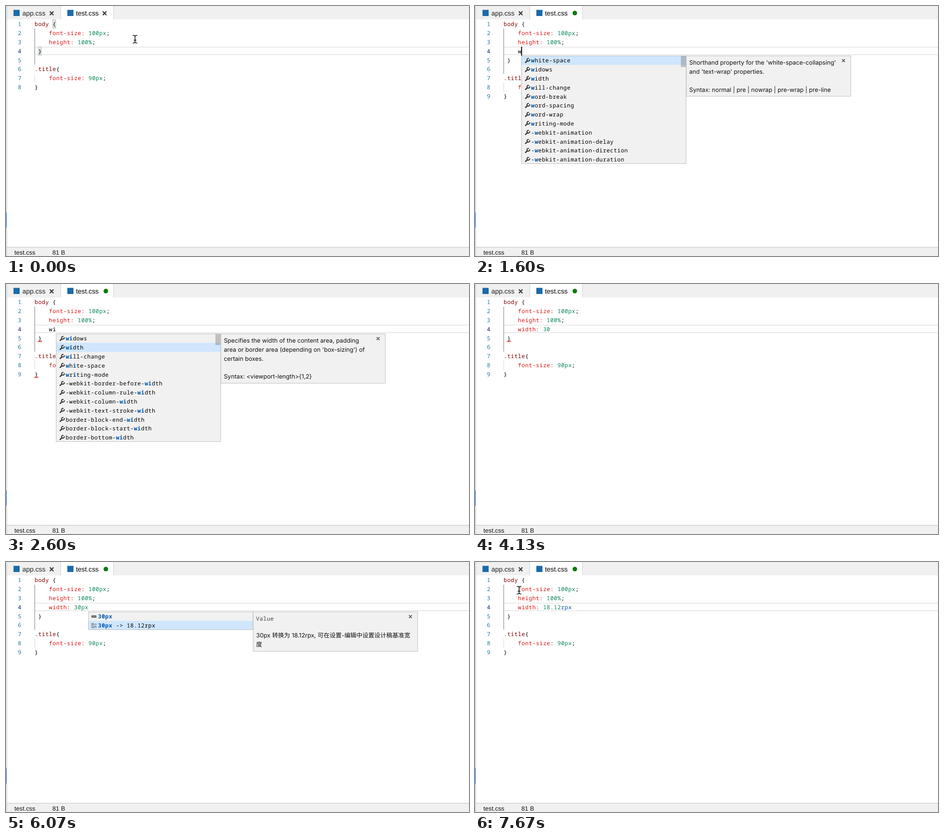
Write an HTML page that moves like this. It is 1019 px wide and 550 px high and loops after 8000 ms.

```html
<!DOCTYPE html>
<html lang="en">
<head>
<meta charset="utf-8">
<title>Stylesheet editor</title>
<style>
  html, body { margin: 0; width: 100%; height: 100%; overflow: hidden; background: #fff; }
  svg { display: block; width: 1019px; height: 550px; }
  text { white-space: pre; text-rendering: geometricPrecision; }
  .code { font: 12.3px "Noto Sans Mono", "DejaVu Sans Mono", monospace; letter-spacing: .52px; fill: #000; }
  .tab { font: 14.75px "Liberation Sans", Arial, sans-serif; fill: #222; }
  .on { fill: #000; }
  .bar { font: 13.6px "Liberation Sans", Arial, sans-serif; fill: #111; }
  .doc { font: 13.1px Inter, "Noto Sans CJK SC", "Noto Sans CJK", sans-serif; fill: #111; }
  .cjk { font-size: 13.2px; }
  .sel { fill: #800000; }
  .prop { fill: #dd1111; }
  .val { fill: #098658; }
  .word { fill: #0451a5; }
  .num { fill: #237893; }
  .cur { fill: #0b216f; }
  .grey { fill: #444; }
  .hit { fill: #0059ac; font-weight: 700; }
  .line { fill: none; stroke-linecap: round; }
</style>
</head>
<body>
<svg viewBox="0 0 1019 550" xmlns="http://www.w3.org/2000/svg">
  <g id="chrome"></g>
  <g id="editor"></g>
  <g id="mouse" class="line">
    <path id="beam" d="M-4.4-8.6Q-.4-8.6 0-6.2Q.4-8.6 4.4-8.6M0-6.4V6.4M-4.4 8.6Q-.4 8.6 0 6.2Q.4 8.6 4.4 8.6M-2.2 2.2H2.2" stroke="#fff" stroke-width="3.4"/>
    <use href="#beam" style="stroke:#000"/>
  </g>
</svg>
<script>
const LOOP = 8000, TICK = 200 / 3;
const LEFT = 63, CHAR = 7.9, TOP = 30, ROW = 19.8;
const $ = id => document.getElementById(id);

const esc = s => s.replace(/&/g, "&amp;").replace(/</g, "&lt;").replace(/>/g, "&gt;");
const text = (x, y, s, cls) => `<text x="${x}" y="${y}" class="${cls}">${s}</text>`;
const rect = (x, y, w, h, fill, more = "") =>
  `<rect x="${x}" y="${y}" width="${w}" height="${h}" fill="${fill}" ${more}/>`;
const path = (d, stroke, width) =>
  `<path class="line" d="${d}" stroke="${stroke}" stroke-width="${width}"/>`;
const cross = (x, y, r, width) =>
  path(`M${x - r} ${y - r}L${x + r} ${y + r}M${x + r} ${y - r}L${x - r} ${y + r}`, "#424242", width);
const colX = col => LEFT + CHAR * col;
const lineY = n => TOP + ROW * (n - 1);
const baseY = n => lineY(n) + 14.3;

// "prop|font-size:" style runs joined by "~"
const runs = s => s.split("~").map(r => {
  const [cls, str] = r.includes("|") ? r.split("|") : ["", r];
  return `<tspan class="${cls}">${esc(str)}</tspan>`;
}).join("");
// *stars* mark the matched letters
const marked = s => s.split("*").map((p, i) => i % 2 ? `<tspan class="hit">${esc(p)}</tspan>` : esc(p)).join("");

const W_ITEMS = ["*w*hite-space", "*w*idows", "*w*idth", "*w*ill-change", "*w*ord-break", "*w*ord-spacing",
  "*w*ord-wrap", "*w*riting-mode", "-*w*ebkit-animation", "-*w*ebkit-animation-delay",
  "-*w*ebkit-animation-direction", "-*w*ebkit-animation-duration"];
const WI_ITEMS = ["*wi*dows", "*wi*dth", "*wi*ll-change", "*w*h*i*te-space", "*w*r*i*ting-mode",
  "-webkit-border-before-*wi*dth", "-webkit-column-rule-*wi*dth", "-webkit-column-*wi*dth",
  "-webkit-text-stroke-*wi*dth", "border-block-end-*wi*dth", "border-block-start-*wi*dth",
  "border-bottom-*wi*dth"];
const P_ITEMS = ["*30p*c", "*30p*t", "*30p*x", "*30p*x -> 18.12rpx"];
const PX_ITEMS = ["*30px*", "*30px* -> 18.12rpx"];

const SPACE_DOC = ["Shorthand property for the 'white-space-collapsing'", "and 'text-wrap' properties.", "",
  "Syntax: normal | pre | nowrap | pre-wrap | pre-line"];
const WIDOWS_DOC = ["Specifies the minimum number of line boxes of a", "block container that must be left in a fragment",
  "after a break.", "", "Syntax: <integer>"];
const WIDTH_DOC = ["Specifies the width of the content area, padding", "area or border area (depending on 'box-sizing') of",
  "certain boxes.", "", "Syntax: <viewport-length>{1,2}"];
const VALUE_DOC = ["30px 转换为 18.12rpx, 可在设置-编辑中设置设计稿基准宽", "度"];

const list = (col, items, pick, width = 362) => ({ col, items, pick, width });
const PROP = "prop|width:~ ";

// each step changes part of the state
const STEPS = [
  [0, { added: null, line: 4, col: 2, caret: 0, braces: 1, dirty: 0, pop: null, doc: null, bad: [] }],
  [330, { line: 3, col: 17, caret: 1, braces: 0 }],
  [800, { added: "", line: 4, col: 4 }],
  [870, { dirty: 1 }],
  [1330, { caret: 0 }],
  [1470, { added: "w", col: 5, caret: 1 }],
  [1530, { pop: list(5, W_ITEMS, 0) }],
  [1600, { doc: SPACE_DOC }],
  [1870, { added: "wi", col: 6 }],
  [1930, { pop: list(6, WI_ITEMS, 0), doc: null }],
  [2000, { doc: WIDOWS_DOC }],
  [2200, { bad: [5, 9] }],
  [2330, { pop: list(6, WI_ITEMS, 1) }],
  [2400, { doc: WIDTH_DOC, caret: 0 }],
  [2670, { added: PROP, col: 11, caret: 1, pop: null, doc: null }],
  [3070, { bad: [5] }],
  [3200, { caret: 0 }],
  [3470, { added: PROP + "~val|3", col: 12, caret: 1 }],
  [3670, { added: PROP + "~val|30", col: 13 }],
  [4130, { caret: 0 }],
  [4200, { added: PROP + "~val|30~word|p", col: 14, caret: 1, pop: list(14, P_ITEMS, 0, 472) }],
  [4400, { added: PROP + "~val|30px", col: 15 }],
  [4470, { pop: list(15, PX_ITEMS, 0, 472) }],
  [4870, { caret: 0, bad: [] }],
  [4930, { pop: list(15, PX_ITEMS, 1, 472) }],
  [5070, { pop: list(15, PX_ITEMS, 1), doc: VALUE_DOC }],
  [5400, { caret: 1 }],
  [5870, { caret: 0 }],
  [6130, { added: PROP + "~val|18.12~word|rpx", col: 19, caret: 1, pop: null, doc: null }],
  [6600, { caret: 0 }],
  [7130, { caret: 1 }],
  [7600, { caret: 0 }]
];

// time, x, y of the pointer
const MOVES = [[0, 284, 73], [330, 252, 82], [800, 252, 82], [7000, 252, 82], [7670, 97, 62], [LOOP, 97, 62]];

function chrome() {
  const edge = "#d0d0d0";
  return rect(0, 0, 1019, 29.5, "#f0f0f0") + rect(121, 0, 115.5, 30, "#fff") +
    rect(120, 0, 1, 29.5, edge) + rect(236, 0, 1, 29.5, edge) +
    rect(0, 530, 1019, 20, "#f0f0f0") + rect(0, 530, 1019, 1.2, "#c8c8c8") +
    rect(0, 0, 1, 550, "#f3f3f3") + rect(1, 0, 1.2, 550, "#c8c8c8") + rect(0, 454, 1.3, 33.5, "#2f8cff") +
    rect(16.5, 8.5, 13.5, 13.5, "#1b6aa8") + rect(135, 8.5, 13.5, 13.5, "#1b6aa8") +
    text(36, 20.5, "app.css", "tab") + text(154, 20.5, "test.css", "tab on") + cross(100.5, 16, 3.3, 2.6) +
    text(18.5, 547, "test.css", "bar") + text(102, 547, "81 B", "bar");
}

function icon(x, y, s, i, count) {
  if (count > 4) {
    return path(`M${x + 9.2} ${y - 4.6}A3 3 0 1 0 ${x + 11.9} ${y - 1.9}`, "#3b3b3b", 2.2) +
      path(`M${x + 6.8} ${y + .6}L${x + 2.8} ${y + 4.2}`, "#3b3b3b", 2.8);
  }
  if (!s.includes(">")) {
    return rect(x + .5, y - 2.3, 11, 4.8, "#555", 'rx="1"') +
      [2, 4.4, 6.8, 9.2].map(d => rect(x + d, y - .9, 1, 1.8, "#ddd")).join("");
  }
  return path(`M${x + .8} ${y - 4}h5M${x + .8} ${y - 1.4}h5M${x + 8} ${y - 2.8}h3.5` +
    `M${x + .8} ${y + 1.6}h2M${x + 5} ${y + 1.6}h6M${x + .8} ${y + 4.4}h7M${x + 10} ${y + 4.4}h1.5`, "#555", 1.2);
}

function popup({ col, items, pick, width }) {
  const x = colX(col), y = 109.7, h = items.length * ROW - .6;
  let out = rect(x, y, width, h, "#f1f1f1") + rect(x, y + pick * ROW, width, ROW, "#cfe6fd");
  items.forEach((s, i) => {
    const mid = y + i * ROW + 10.2;
    out += icon(x + 6, mid, s, i, items.length) + text(x + 21, mid + 4.4, marked(s), "code");
  });
  if (items.length > 4) out += rect(x + width - 11.5, y, 11, 24.5, "#646464", 'opacity=".35"');
  return out + rect(x, y, width, h, "none", 'stroke="#bdbdbd"');
}

function details(lines, pop) {
  const x = colX(pop.col) + pop.width + .5, y = 109.7, value = lines === VALUE_DOC;
  const h = value ? 86.8 : lines.length * ROW + 9.6;
  let out = rect(x, y, 362, h, "#f1f1f1", 'stroke="#bdbdbd"') + cross(x + 346, y + 10.4, 2.6, 1.7);
  if (value) out += text(x + 6.2, y + 19.4, "Value", "code grey");
  lines.forEach((s, i) => {
    out += text(x + 6.5, y + (value ? 56.6 : 19.4) + i * ROW, esc(s), value ? "doc cjk" : "doc");
  });
  return out;
}

function editor(s) {
  const more = s.added === null ? 0 : 1;
  const lines = ["sel|body~ {", "    ~prop|font-size:~ ~val|100px~;", "    ~prop|height:~ ~val|100%~;",
    ...(more ? ["    ~" + s.added] : []), " }", "", "sel|.title~{", "    ~prop|font-size:~ ~val|90px~;", "}"];
  const top = lineY(s.line);
  let out = rect(LEFT, top + .2, 956, 1.8, "#e6e6e6") + rect(LEFT, top + 16.8, 956, 1.8, "#e6e6e6");
  out += rect(62.7, lineY(2), 1, ROW * (4 + more), "#707070") +
    rect(62.7, lineY(7 + more), 1, ROW, "#d3d3d3");
  if (s.braces) {
    for (const [n, col] of [[1, 5], [4, 1]]) {
      out += rect(colX(col) + .3, lineY(n) + .5, 6.8, 18.4, "#e4efe4", 'stroke="#b4b4b4"');
    }
  }
  lines.forEach((l, i) => {
    const n = i + 1;
    out += text(26.3, baseY(n), n, "code " + (n === s.line ? "cur" : "num")) +
      text(LEFT, baseY(n), runs(l), "code");
  });
  for (const n of s.bad) {
    const x = colX(n === 5 ? 1 : 0) - .5;
    out += path(`M${x} ${lineY(n) + 18.2}l2.2-2.2l2.2 2.2l2.2-2.2l1.6 1.4`, "#d81e1e", 1.3);
  }
  if (s.caret) out += rect(colX(s.col) - 1, top, 2, ROW, "#000");
  if (s.pop) out += popup(s.pop);
  if (s.doc) out += details(s.doc, s.pop);
  return out + (s.dirty ? '<circle cx="219.7" cy="15.6" r="5" fill="#0a7a0a"/>' : cross(217, 16, 3.3, 2.6));
}

function pointer(t) {
  const hidden = t >= 800 && t < 7000;
  $("mouse").style.display = hidden ? "none" : "";
  if (hidden) return;
  const now = t >= 7670 ? t : Math.floor(t / TICK + .02) * TICK;
  const k = Math.max(1, MOVES.findIndex(m => m[0] > now));
  const [t0, x0, y0] = MOVES[k - 1], [t1, x1, y1] = MOVES[k];
  const p = Math.max(0, Math.min(1, (now - t0) / (t1 - t0))), e = p * p * (3 - 2 * p);
  $("mouse").setAttribute("transform", `translate(${x0 + (x1 - x0) * e} ${y0 + (y1 - y0) * e})`);
}

let shown = -1;
const start = performance.now();
function frame() {
  const t = (performance.now() - start) % LOOP;
  const past = STEPS.filter(step => step[0] <= t + 1);
  if (past.length !== shown) {
    shown = past.length;
    $("editor").innerHTML = editor(Object.assign({}, ...past.map(step => step[1])));
  }
  pointer(t);
  requestAnimationFrame(frame);
}

$("beam").removeAttribute("stroke");
$("beam").style.stroke = "inherit";
$("mouse").innerHTML = ["#fff|3.4", "#000|1.5"].map(s => {
  const [stroke, width] = s.split("|");
  return path($("beam").getAttribute("d"), stroke, width);
}).join("");
$("chrome").innerHTML = chrome();
frame();
</script>
</body>
</html>
```
